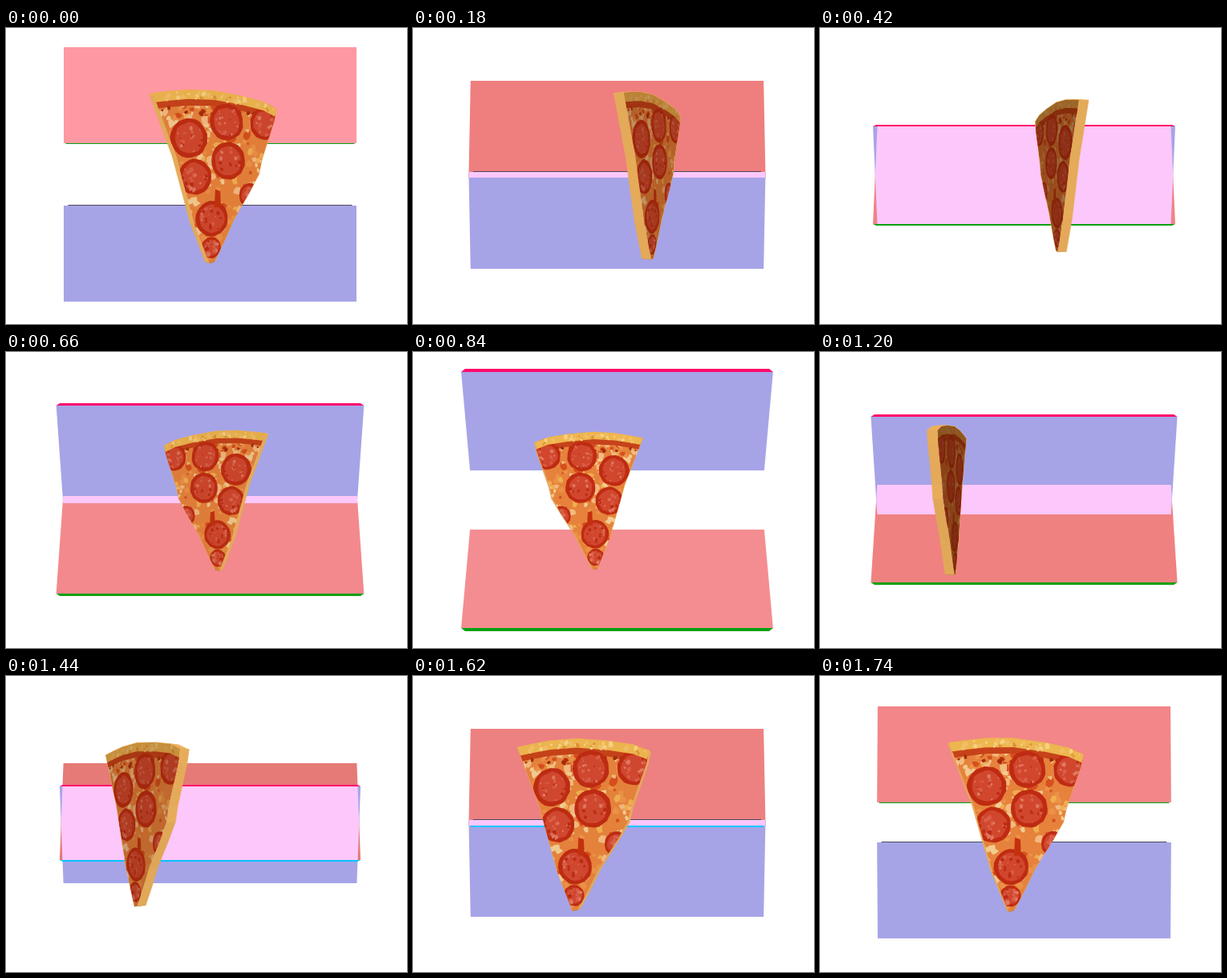
An HTML page with a canvas that plays this animation: 500x370 px, repeating every 1800 ms.

```html
<!DOCTYPE html>
<html lang="en">
<head>
<meta charset="utf-8">
<title>Turning slice</title>
<style>
  html, body { margin: 0; width: 100%; height: 100%; overflow: hidden; background: #fff; }
  canvas { display: block; width: 500px; height: 370px; }
</style>
</head>
<body>
<canvas id="stage" width="500" height="370"></canvas>
<script>
const ctx = document.getElementById('stage').getContext('2d');
const LOOP = 1800, STEP = 60;

const lerp = (a, b, k) => a + (b - a) * k;
const rgb = c => `rgb(${c.map(Math.round).join(',')})`;

function trace(points) {
  ctx.beginPath();
  points.forEach(([x, y]) => ctx.lineTo(x, y));
  ctx.closePath();
}
function fill(points, color) {
  trace(points);
  ctx.fillStyle = color;
  ctx.fill();
}

// ---- panels ----
const MID_X = 254.5;
const BLUE = '#a6a4e7', PINK = '#fcc7fa', GREEN = '#08a010', CYAN = '#00c4ff';
const MAGENTA = '#ff0a6c', DARK = '#4a4658';
const RED_STEPS = [
  [0, 254, 152, 162], [60, 244, 134, 138], [180, 239, 126, 126],
  [840, 244, 141, 145], [1200, 240, 129, 129], [1440, 229, 122, 118],
  [1740, 242, 134, 136], [1800, 254, 152, 162]
];

function redAt(t) {
  const i = RED_STEPS.findIndex(s => s[0] > t);
  const a = RED_STEPS[i - 1], b = RED_STEPS[i];
  const k = (t - a[0]) / (b[0] - a[0]);
  return rgb([1, 2, 3].map(n => lerp(a[n], b[n], k)));
}

function band(y1, half1, y2, half2) {
  return [[MID_X - half1, y1], [MID_X + half1, y1], [MID_X + half2, y2], [MID_X - half2, y2]];
}

function drawPanels(t) {
  const u = 1 - Math.abs(t / 900 - 1);
  const center = 84 + 214 * u;
  const half = (120 + 3.2 * u) / 2;
  const top = Math.round(center - half), bottom = Math.round(center + half);
  const wide = 182.5 + 12.8 * u;
  const mirror = Math.round(2 * (183 + 2 * u));
  const flip = points => points.map(([x, y]) => [x, mirror - y]);
  const red = band(top, 182.5 + u, bottom, wide);
  const blue = flip(red);

  fill(red, redAt(t));
  fill(blue, BLUE);
  ctx.save();
  trace(red);
  ctx.clip();
  fill(blue, PINK);
  ctx.restore();

  const thick = Math.round(1.2 + 2.7 * u);
  const edge = band(bottom, wide - (u < .3 ? 2 : 0), bottom + thick, wide - 3 - 2 * u);
  const covered = u > .185 && u < .46;
  if (!covered) fill(edge, GREEN);
  else if (t > 900) fill(edge, CYAN);

  if (u < .25) {
    const y = mirror - bottom;
    fill(band(y - 1, wide - 6, y, wide - 5), DARK);
  } else {
    fill(flip(edge), MAGENTA);
  }
}

// ---- slice ----
const AXIS_X = 231, AXIS_Y = 186, DEPTH = 630;
const FRONT = 78, BACK = 66;
const CRUST = [[-75, -88], [-57, -91], [-35, -94], [-5, -95], [31, -91], [58, -86], [75, -79]];
const OUTLINE = [...CRUST, [72, -65], [56, -20], [52, -3], [40, 17], [20, 48], [8, 72],
  [-4, 94], [-10, 95], [-28, 51], [-30, 44], [-49, -22]];
const PEPPERONI = [[-34, -42, 22], [11, -61, 21], [59, -61, 19], [13, -18, 21.5],
  [-27, 0, 20], [-7, 46, 20], [40, 21, 14], [-8, 78, 12]];

let seed = 7;
function random() {
  seed = (seed * 16807) % 2147483647;
  return seed / 2147483647;
}
const pick = list => list[Math.floor(random() * list.length)];

function blob(x, y, r, n, rough) {
  return Array.from({ length: n }, (_, i) => {
    const a = i / n * 2 * Math.PI, k = r * (1 - rough * random());
    return [x + k * Math.cos(a), y + k * Math.sin(a)];
  });
}
function below(points, from, to) {
  const shift = d => points.map(([x, y]) => [x, y + d]);
  return [...shift(from), ...shift(to).reverse()];
}

// Flat shapes of the topping, in local coordinates
const topping = [];
const add = (points, color) => topping.push({ points, color });
for (let i = 0; i < 300; i++) {
  const y = lerp(-85, 92, random() ** 1.3);
  add(blob(lerp(-75, 75, random()), y, 2 + 5 * random(), 7, .6),
    pick(['#f5cd92', '#f2b050', '#d8501e', '#ee9448', '#f4bc80']));
}
add(below(CRUST, 9, 17), '#c8431a');
for (let i = 0; i < 24; i++) {
  add(blob(lerp(-66, 66, random()), -74 + 5 * random(), 2 + 3 * random(), 6, .5),
    pick(['#b5300f', '#e68a3a', '#a52c0c']));
}
for (const [x, y, r] of PEPPERONI) {
  add(blob(x, y, r, 26, .05), '#c02c12');
  add(blob(x, y, r * .8, 20, .1), '#d2482f');
  for (let i = 0; i < 18; i++) {
    const a = random() * 6.28, d = r * .72 * Math.sqrt(random());
    add(blob(x + d * Math.cos(a), y + d * Math.sin(a), 1 + 2.6 * random(), 6, .5),
      pick(['#e37a62', '#bd2c12', '#dc6048']));
  }
}
add([[-3, 14], [3, 16], [4, 34], [-4, 34]], '#c5320f');
add(below(CRUST, -1, 10), '#f0b850');
for (let i = 0; i < 40; i++) {
  const x = lerp(-72, 72, random());
  add(blob(x, -92 + x * x * .0014 + 8 * random() + x * .06, 1.5 + 2.5 * random(), 6, .5),
    pick(['#f9d384', '#e0943a', '#f4c168']));
}

function drawSlice(t) {
  const angle = (t - 1690) / LOOP * 2 * Math.PI;
  const sin = Math.sin(angle), cos = Math.cos(angle);

  const project = ([x, y], z) => {
    const depth = z * cos - x * sin;
    const s = DEPTH / (DEPTH - depth);
    return [AXIS_X + (x * cos + z * sin) * s, AXIS_Y + y * s, depth];
  };
  const flat = (points, z) => points.map(p => project(p, z));
  const area = points => points.reduce((sum, [x, y], i) => {
    const [nx, ny] = points[(i + 1) % points.length];
    return sum + x * ny - nx * y;
  }, 0);

  const front = flat(OUTLINE, FRONT), back = flat(OUTLINE, BACK);

  const walls = OUTLINE.map((p, i) => {
    const j = (i + 1) % OUTLINE.length, q = OUTLINE[j];
    const slope = (p[0] - q[0]) / Math.hypot(q[0] - p[0], q[1] - p[1]);
    const light = slope > .7 ? .72 : 1 - .1 * Math.max(0, slope);
    return {
      points: [front[i], front[j], back[j], back[i]],
      depth: front[i][2] + front[j][2],
      color: rgb([236 * light, 176 * light, 92 * light])
    };
  }).sort((a, b) => a.depth - b.depth);

  ctx.lineWidth = .6;
  for (const w of walls) {
    fill(w.points, w.color);
    ctx.strokeStyle = w.color;
    ctx.stroke();
  }

  const showsFront = area(front) > 0;
  const face = showsFront ? front : back;
  const z = showsFront ? FRONT : BACK;
  ctx.save();
  trace(face);
  ctx.clip();
  fill(face, '#e8843c');
  for (const s of topping) fill(flat(s.points, z), s.color);
  fill(face, `rgba(80,26,0,${.72 * (1 - Math.abs(cos))})`);
  ctx.restore();
}

function frame(now) {
  const t = Math.floor((now % LOOP) / STEP) * STEP;
  ctx.fillStyle = '#fff';
  ctx.fillRect(0, 0, 500, 370);
  drawPanels(t);
  drawSlice(t);
}

let start = null;
function tick() {
  const now = performance.now();
  if (start === null) start = now;
  frame(now - start);
  requestAnimationFrame(tick);
}
tick();
</script>
</body>
</html>
```
